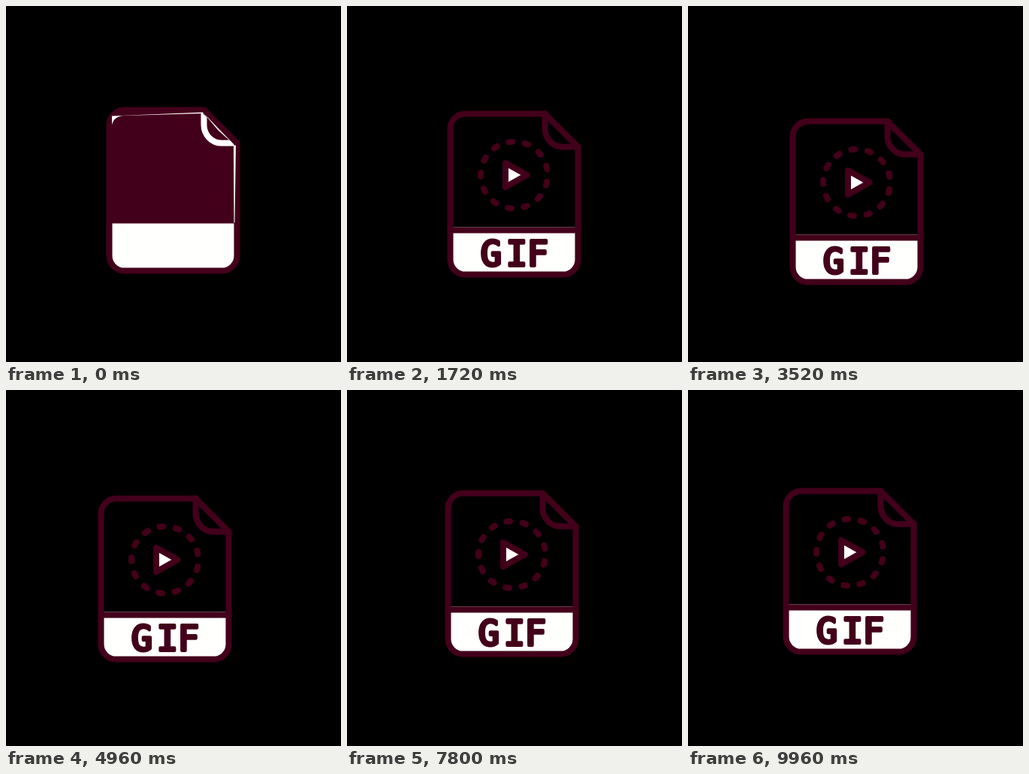
These frames come from a looping animation (446x474 px, 10000 ms). An HTML page:

```html
<!DOCTYPE html>
<html lang="en">
<head>
<meta charset="utf-8">
<title>Animation file icon</title>
<style>
  html, body { margin: 0; width: 100%; height: 100%; overflow: hidden; background: #000; }
  svg { display: block; width: 100vw; height: 100vh; }
  .ink { fill: #43001a; }
  .paper { fill: #fffffe; }
  .line { fill: none; stroke: #43001a; stroke-width: 8; stroke-linecap: round; stroke-linejoin: round; }
  .play { fill: #fffffe; }
  .label {
    font: 47px "DejaVu Sans Mono", monospace;
    text-anchor: middle;
    fill: #43001a; stroke: #43001a; stroke-width: 4; stroke-linejoin: round;
  }
</style>
</head>
<body>
<svg viewBox="0 0 446 474">
  <defs>
    <path id="page" d="M158 144H264L308 188V338A20 20 0 0 1 288 358H158A20 20 0 0 1 138 338V164A20 20 0 0 1 158 144Z"/>
    <path id="fold" d="M264 144V164A24 24 0 0 0 288 188H308"/>
    <path id="band" d="M138 295H308V338A20 20 0 0 1 288 358H158A20 20 0 0 1 138 338Z"/>
  </defs>
  <g id="icon">
    <g id="opening">
      <use href="#page" class="ink"/>
      <use href="#band" class="paper"/>
      <use href="#fold" fill="none" stroke="#fffffe" stroke-width="8"/>
      <use href="#page" class="line"/>
      <path class="paper" d="M141.500 164V152L263 147V148.500L158 151.500Q144 152 141.500 164ZM263 147.500L304 190L283 171ZM303.500 191H306.500L305 294H304Z"/>
    </g>
    <g id="full">
      <use href="#band" class="paper"/>
      <use href="#page" class="line"/>
      <use href="#fold" class="line"/>
      <path class="line" d="M138 299H308"/>
      <circle class="line" cx="223" cy="225.500" r="44.500" pathLength="130"
        stroke-dasharray="2.200 7.800" transform="rotate(-16 223 225.500)"/>
      <path class="line play" d="M211.500 209.500L240 225.500L211.500 241.500Z"/>
      <text class="label" x="192.500 226.500 254.500" y="346">GIF</text>
    </g>
  </g>
</svg>
<script>
const LOOP = 10, STEP = 0.04;

// Turning points of the drift: seconds, x, y
const drift = [
  [0, 0, -5], [0.4, 6, -8], [1.06, -3, 1], [1.72, 0, 0], [2.1, -2, -5],
  [3.2, 3, 12], [3.52, 2, 10], [4.25, 3, -4], [4.96, -11, 1], [5.25, -12, 5],
  [6.28, -4, -10], [6.95, -1, 7], [7.8, -3, -6], [8.35, 1, 5], [9, -5, -5],
  [9.55, -5, 3], [9.96, -7, -9]
];

const byId = id => document.getElementById(id);
const icon = byId("icon"), opening = byId("opening"), full = byId("full");
const show = (el, on) => el.setAttribute("display", on ? "inline" : "none");

const slope = (i, n) => (drift[i + 1][n] - drift[i][n]) / (drift[i + 1][0] - drift[i][0]);

// Flat at turning points, harmonic mean of the slopes elsewhere
function tangent(i, n) {
  if (i === 0 || i === drift.length - 1) return 0;
  const a = slope(i - 1, n), b = slope(i, n);
  return a * b > 0 ? 2 * a * b / (a + b) : 0;
}

function along(t, n) {
  const next = drift.findIndex(k => k[0] > t);
  if (next < 0) return drift[drift.length - 1][n];
  const i = next - 1, a = drift[i], b = drift[next];
  const span = b[0] - a[0], u = (t - a[0]) / span, v = 1 - u;
  return a[n] * v * v * (1 + 2 * u) + b[n] * u * u * (3 - 2 * u)
    + span * u * v * (tangent(i, n) * v - tangent(next, n) * u);
}

function draw(seconds) {
  const t = Math.floor((seconds % LOOP) / STEP + 1e-6) * STEP + 1e-9;
  const x = along(t, 1) - 0.5, y = along(t, 2) - 0.4;
  icon.setAttribute("transform", `translate(${x.toFixed(2)} ${y.toFixed(2)})`);
  show(opening, t < STEP);
  show(full, t >= STEP);
}

let start;
function tick(now) {
  start ??= now;
  draw((now - start) / 1000);
  requestAnimationFrame(tick);
}
draw(0);
requestAnimationFrame(tick);
</script>
</body>
</html>
```
